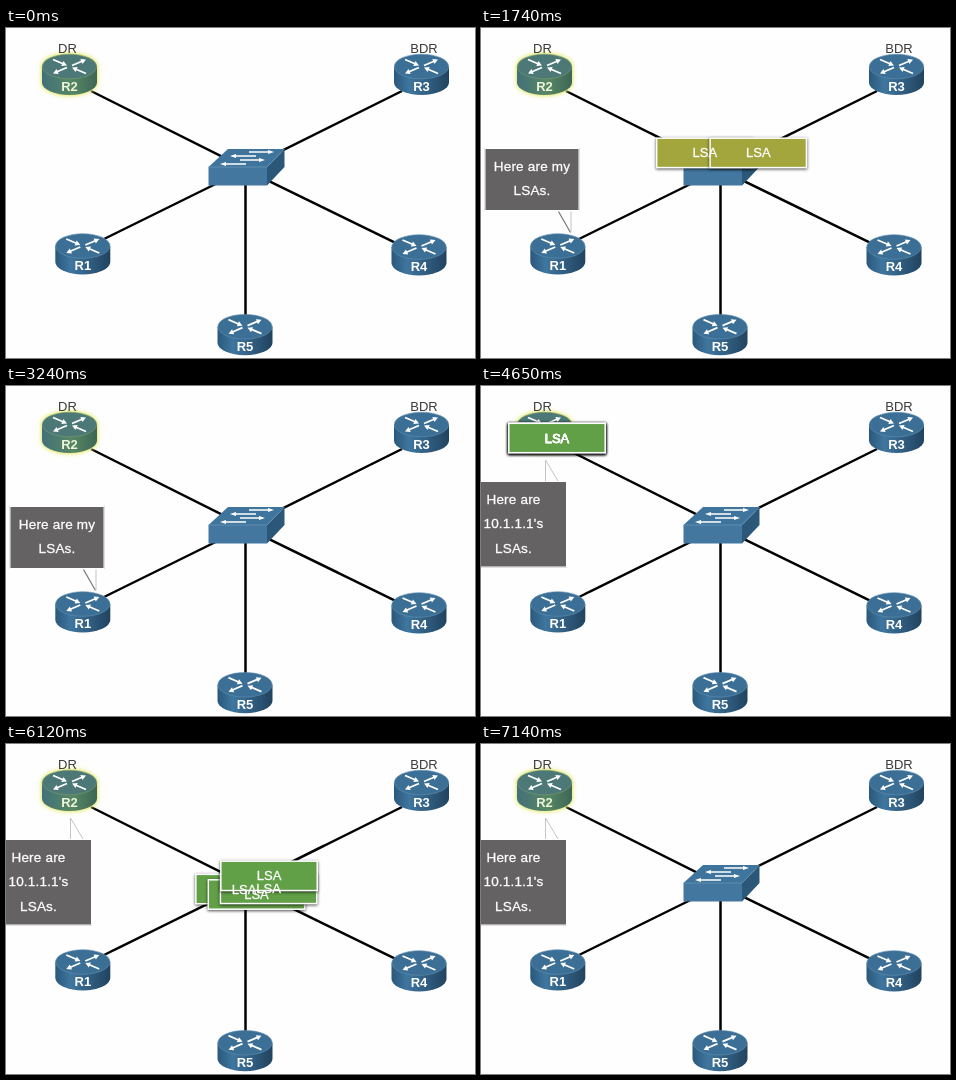
Recreate the animation shown at these times as an HTML page. Size 469 px wide and 330 px high, loop 8.94 s.

```html
<!DOCTYPE html>
<html lang="en">
<head>
<meta charset="utf-8">
<title>LSA flooding</title>
<style>
  html, body { margin: 0; width: 100%; height: 100%; overflow: hidden; background: #fefefe; }
  svg { display: block; width: 469px; height: 330px; }
  text { font: 13px "Liberation Sans", Arial, sans-serif; text-anchor: middle; fill: #fff; }
  .role { fill: #3a3a3a; }
  .name { font-weight: bold; }
  .bubble text { font-size: 13.5px; letter-spacing: .2px; }
  .bubble text, #tags text { stroke: #fff; stroke-width: .3; }
  .bubble rect { fill: #646263; stroke: #fff; filter: drop-shadow(.5px .5px .7px rgba(0, 0, 0, .5)); }
  .tail { fill: #fff; }
  .edge { fill: none; stroke: #777; stroke-width: 1.2; }
  .edge.soft { stroke: #c4c4c4; stroke-width: 1; }
  .box { stroke: #fff; stroke-width: 1.5; filter: drop-shadow(.7px 1.5px 1.6px rgba(0, 0, 0, .7)); }
  .glow { filter: drop-shadow(0 0 1.5px #dfe66a) drop-shadow(0 0 2.5px #e9ee80); }
</style>
</head>
<body>
<svg id="stage" viewBox="0 0 469 330">
  <defs>
    <linearGradient id="blue">
      <stop offset="0" stop-color="#2a587b"/>
      <stop offset=".28" stop-color="#3f769f"/>
      <stop offset="1" stop-color="#21435f"/>
    </linearGradient>
    <linearGradient id="green">
      <stop offset="0" stop-color="#42707a"/>
      <stop offset=".55" stop-color="#578764"/>
      <stop offset="1" stop-color="#3d6656"/>
    </linearGradient>
  </defs>
  <path d="M85 63L240 140.500L396 63M98 211L240 141M389 214.600L240 141.800M239.500 288V150" fill="none" stroke="#000" stroke-width="2.500"/>
  <g id="net"></g>
  <text class="role" x="61.500" y="25">DR</text>
  <text class="role" x="418" y="25">BDR</text>
  <g id="boxes"></g>
  <g id="tags"></g>
  <g id="ask" class="bubble">
    <rect x="4" y="120.500" width="94" height="62"/>
    <path class="tail" d="M76.500 182L89.500 204.500V182Z"/>
    <path class="edge" d="M77.500 183.500L89.500 204.500"/>
    <path class="edge soft" d="M90 183.500V204.500"/>
    <text x="51" y="143">Here are my</text>
    <text x="51" y="167">LSAs.</text>
  </g>
  <g id="relay" class="bubble">
    <rect x="-9" y="95.500" width="94.500" height="85.500"/>
    <path class="tail" d="M64.500 74V96H77Z"/>
    <path class="edge soft" d="M64.500 95V74L77 95"/>
    <text x="32.500" y="118">Here are</text>
    <text x="32.500" y="142">10.1.1.1's</text>
    <text x="32.500" y="167">LSAs.</text>
  </g>
</svg>
<script>
const LOOP = 8940, STEP = 30;
const $ = id => document.getElementById(id);

function add(parent, tag, attrs, text) {
  const el = document.createElementNS("http://www.w3.org/2000/svg", tag);
  for (const key in attrs) el.setAttribute(key, attrs[key]);
  if (text) el.textContent = text;
  return parent.appendChild(el);
}

function arrow(parent, x1, y1, x2, y2, w, head) {
  const len = Math.hypot(x2 - x1, y2 - y1), neck = len - head;
  const angle = Math.atan2(y2 - y1, x2 - x1) * 180 / Math.PI;
  add(parent, "path", {
    d: `M0 ${-w / 2}H${neck}V${-w * 1.5}L${len} 0L${neck} ${w * 1.5}V${w / 2}H0Z`,
    fill: "#fff", transform: `translate(${x1} ${y1}) rotate(${angle})`
  });
}

function router(name, x, y, lead) {
  const g = add($("net"), "g", { transform: `translate(${x} ${y})` });
  const body = add(g, "g", lead ? { class: "glow" } : {});
  add(body, "path", {
    d: "M-27.500 -8V8A27.500 12.500 0 0 0 27.500 8V-8Z",
    fill: `url(#${lead ? "green" : "blue"})`
  });
  add(body, "ellipse", {
    cy: -8, rx: 27.2, ry: 12.3, fill: lead ? "#4c7878" : "#3c6f96",
    stroke: lead ? "#7d9c70" : "#6490b0", "stroke-width": .6
  });
  arrow(g, -16.5, -15, -2.5, -9, 1.8, 5);
  arrow(g, 2.5, -9, 16.5, -15, 1.8, 5);
  arrow(g, -2.5, -7, -16.5, -1, 1.8, 5);
  arrow(g, 16.5, -1, 2.5, -7, 1.8, 5);
  add(g, "text", { class: "name", y: 16, ...(lead && { style: "fill:#eef5d8" }) }, name);
}

function hub() {
  const g = $("net");
  add(g, "path", { d: "M202.500 139L222 121H278.500L261 139Z", fill: "#3f759d" });
  add(g, "path", { d: "M202.500 139H261V157.500H202.500Z", fill: "#43779f" });
  add(g, "path", { d: "M261 139L278.500 121V139L261 157.500Z", fill: "#2b5879" });
  add(g, "path", { d: "M202.500 139H261L278.500 121", fill: "none", stroke: "#6b97b6", "stroke-width": .7 });
  arrow(g, 243, 124, 268, 124, 1.4, 6);
  arrow(g, 250, 128, 224, 128, 1.4, 6);
  arrow(g, 234, 132, 259, 132, 1.4, 6);
  arrow(g, 240, 136, 214, 136, 1.4, 6);
}

router("R2", 63.5, 46.5, true);
router("R3", 415.5, 46.5);
router("R1", 76.8, 226);
router("R4", 413, 227);
router("R5", 239, 306.7);
hub();

// Box centres at each stop
const R1 = [76, 236.5], R2 = [76, 52], R3 = [426, 52], R4 = [420, 234], R5 = [250.5, 313];
const MID = [250.5, 138];

// Each pair of times is the start and end of one phase
const first = { fill: "#a2a63d", from: R1, show: [990, 1200], enter: [1200, 1620], leave: [1650, 2240], hide: [2760, 3240] };
const second = { fill: "#61a047", from: R2, show: [4290, 4650], enter: [5130, 5730], leave: [6090, 6510], hide: [6780, 7140] };

const packet = (phase, to) => ({
  ...phase, to,
  box: add($("boxes"), "rect", { class: "box", x: -48.2, y: -14.7, width: 96.4, height: 29.4, fill: phase.fill }),
  tag: add($("tags"), "text", { y: 4.5 }, "LSA")
});
const packets = [
  ...[R2, R3].map(to => packet(first, to)),
  ...[R1, R5, R4, R3].map(to => packet(second, to))
];

const part = (t, [a, b]) => Math.min(1, Math.max(0, (t - a) / (b - a)));
const mix = (a, b, k) => a + (b - a) * k;

function render(t) {
  $("ask").style.display = t >= 990 && t < 4290 ? "" : "none";
  $("relay").style.display = t >= 4290 ? "" : "none";
  for (const p of packets) {
    const alpha = part(t, p.show) * (1 - part(t, p.hide));
    const k = part(t, p.enter), m = part(t, p.leave);
    const [x, y] = [0, 1].map(i => mix(mix(p.from[i], MID[i], k), p.to[i], m));
    for (const el of [p.box, p.tag]) {
      el.style.display = alpha ? "" : "none";
      el.setAttribute("opacity", alpha);
      el.setAttribute("transform", `translate(${x} ${y})`);
    }
  }
}

const start = performance.now();
function tick() {
  const t = (performance.now() - start) % LOOP;
  render(Math.floor(t / STEP) * STEP);
  requestAnimationFrame(tick);
}
tick();
</script>
</body>
</html>
```
